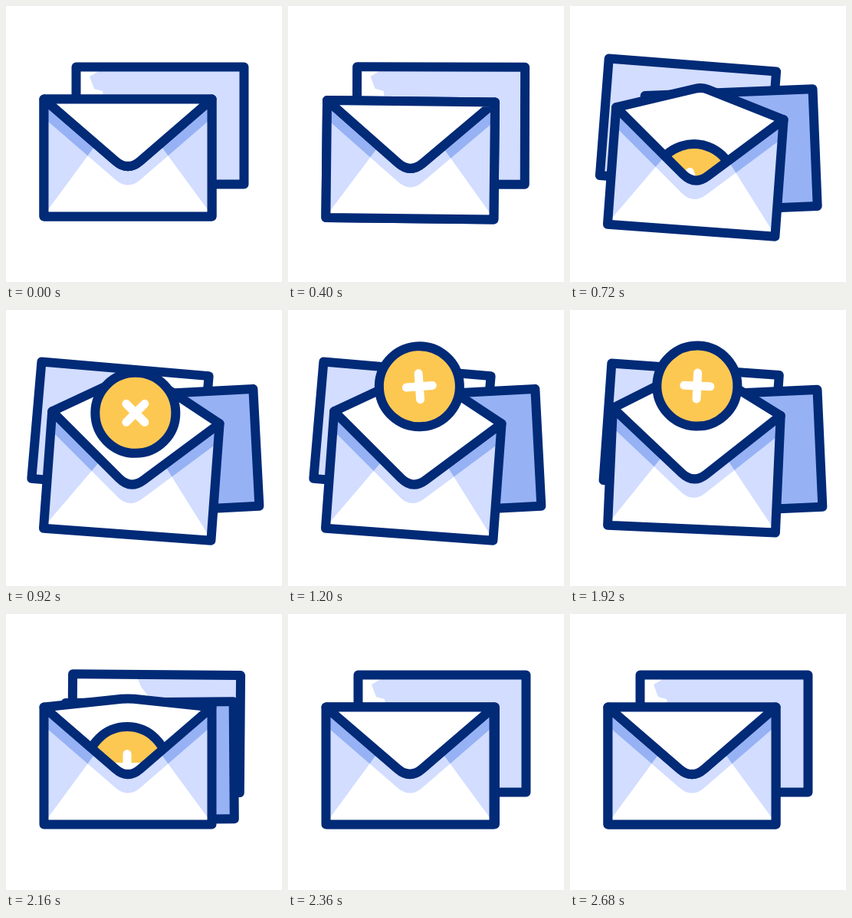
An HTML page with a canvas for the animation above (2800 ms loop, 360 by 360 pixels).

```html
<!DOCTYPE html>
<html lang="en">
<head>
<meta charset="utf-8">
<title>Envelope and coin</title>
<style>
  html, body { margin: 0; width: 100%; height: 100%; overflow: hidden; background: #fff; }
  canvas { display: block; width: 360px; height: 360px; }
</style>
</head>
<body>
<canvas id="stage" width="360" height="360"></canvas>
<script>
const ctx = document.getElementById('stage').getContext('2d');
const LOOP = 2800, W = 109.5, H = 76.5, DEPTH = 94.5;
const NAVY = '#012a77', PALE = '#d2ddff', BLUE = '#96b2f4', GOLD = '#fdc852', WHITE = '#fff';

const clamp = x => Math.min(1, Math.max(0, x));
const mix = (a, b, p) => a + (b - a) * p;
const ease = x => x < .5 ? 4 * x ** 3 : 1 - 4 * (1 - x) ** 3;
const ramp = (t, from, to) => ease(clamp((t - from) / (to - from)));
// Goes 0 -> 1 during a..b and back to 0 during c..d.
const trip = (t, a, b, c, d) => ramp(t, a, b) - ramp(t, c, d);

function poly(...points) {
  const path = new Path2D();
  for (let i = 0; i < points.length; i += 2) path.lineTo(points[i], points[i + 1]);
  path.closePath();
  return path;
}

function fill(path, color) {
  ctx.fillStyle = color;
  ctx.fill(path);
}

function outline(path, color = NAVY, width = 12) {
  ctx.strokeStyle = color;
  ctx.lineWidth = width;
  ctx.stroke(path);
}

function placed(x, y, degrees, draw) {
  ctx.save();
  ctx.translate(x, y);
  ctx.rotate(degrees * Math.PI / 180);
  draw();
  ctx.restore();
}

function clipped(path, draw) {
  ctx.save();
  ctx.clip(path);
  draw();
  ctx.restore();
}

// Rounded V between the top corners; s = 1 points down, negative points up.
function flapPath(s, drop = 0) {
  const y = v => -H + drop + v * s;
  const r = s > 0 ? 16 : 8;
  const shoulder = DEPTH * (1 - r / W);
  const path = new Path2D();
  path.moveTo(-W, y(0));
  path.lineTo(-r, y(shoulder));
  path.quadraticCurveTo(0, y(DEPTH), r, y(shoulder));
  path.lineTo(W, y(0));
  return path;
}

// Continues a flap path along the sheet edge at height y and closes it.
function closeAt(path, y) {
  path.lineTo(W, y);
  path.lineTo(-W, y);
  path.closePath();
  return path;
}

const sheet = poly(-W, -H, W, -H, W, H, -W, H);
const pocket = closeAt(flapPath(1), H);
const mouth = flapPath(1);
const shade = closeAt(flapPath(1, 24.5), -H);
const hinge = new Path2D(`M-100 ${-H}H100`);
const sides = poly(-W, -H, -42, -17, -W, 75);
sides.addPath(poly(W, -H, 42, -17, W, 75));
const disc = new Path2D();
disc.arc(0, 0, 52.5, 0, 7);
const plus = new Path2D('M0-17V17M-17 0H17');

const glints = {
  rest: poly(-W, -H, -80, -71, -92, -64, -86, -48, -75, -45, -74, -38, -W, -38),
  open: poly(0, -H, W, -H, W, H, 0, H),
  back: poly(-W, -H, -27, -H, -20, -60, -10, -48, -10, H, -W, H)
};

function paper(color, glint) {
  fill(sheet, color);
  if (glint) clipped(sheet, () => fill(glint, WHITE));
  outline(sheet);
}

function coin(y, spin) {
  placed(-1, y, spin, () => {
    fill(disc, GOLD);
    outline(disc);
    outline(plus, WHITE, 11);
  });
}

function front() {
  fill(pocket, WHITE);
  clipped(pocket, () => {
    fill(shade, PALE);
    fill(sides, PALE);
    clipped(sides, () => fill(shade, BLUE));
  });
  outline(pocket);
}

function render(t) {
  const tilt = trip(t, 240, 720, 1700, 2180);
  const left = trip(t, 280, 900, 1683, 2356);
  const right = trip(t, 400, 870, 1840, 2480);
  const turn = trip(t, 400, 850, 1760, 2360);
  const lift = trip(t, 640, 1108, 1798, 2330);
  const flap = mix(1, -.65, trip(t, 440, 873, 1980, 2400));
  const spin = -180 * (1 - clamp((t - 580) / 970)) ** 3;
  const glint = t < 640 || t > 2340 ? glints.rest
    : t < 800 ? null
    : t < 2000 ? glints.open : glints.back;
  const x = mix(159, 163.8, tilt), y = mix(198, 216.5, tilt), angle = 4.2 * tilt;

  ctx.fillStyle = WHITE;
  ctx.fillRect(0, 0, 360, 360);
  ctx.lineCap = ctx.lineJoin = 'round';

  placed(mix(201, 149, left), mix(156, 153, left), 4.9 * left, () => paper(PALE, glint));
  // The blue sheet slides out from behind the envelope.
  placed(mix(x, 217, right), mix(y, 185, right), mix(angle, -3, turn), () => paper(BLUE));
  placed(x, y, angle, () => {
    const lid = flapPath(flap);
    fill(mouth, WHITE);
    if (flap < 0) {
      fill(lid, WHITE);
      outline(hinge, WHITE, 3);
      outline(lid);
    }
    coin(mix(19, -117, lift), spin);
    front();
    if (flap >= 0) {
      lid.closePath();
      fill(lid, WHITE);
      outline(lid);
    }
  });
}

function tick() {
  render(performance.now() % LOOP);
  requestAnimationFrame(tick);
}
tick();
</script>
</body>
</html>
```
